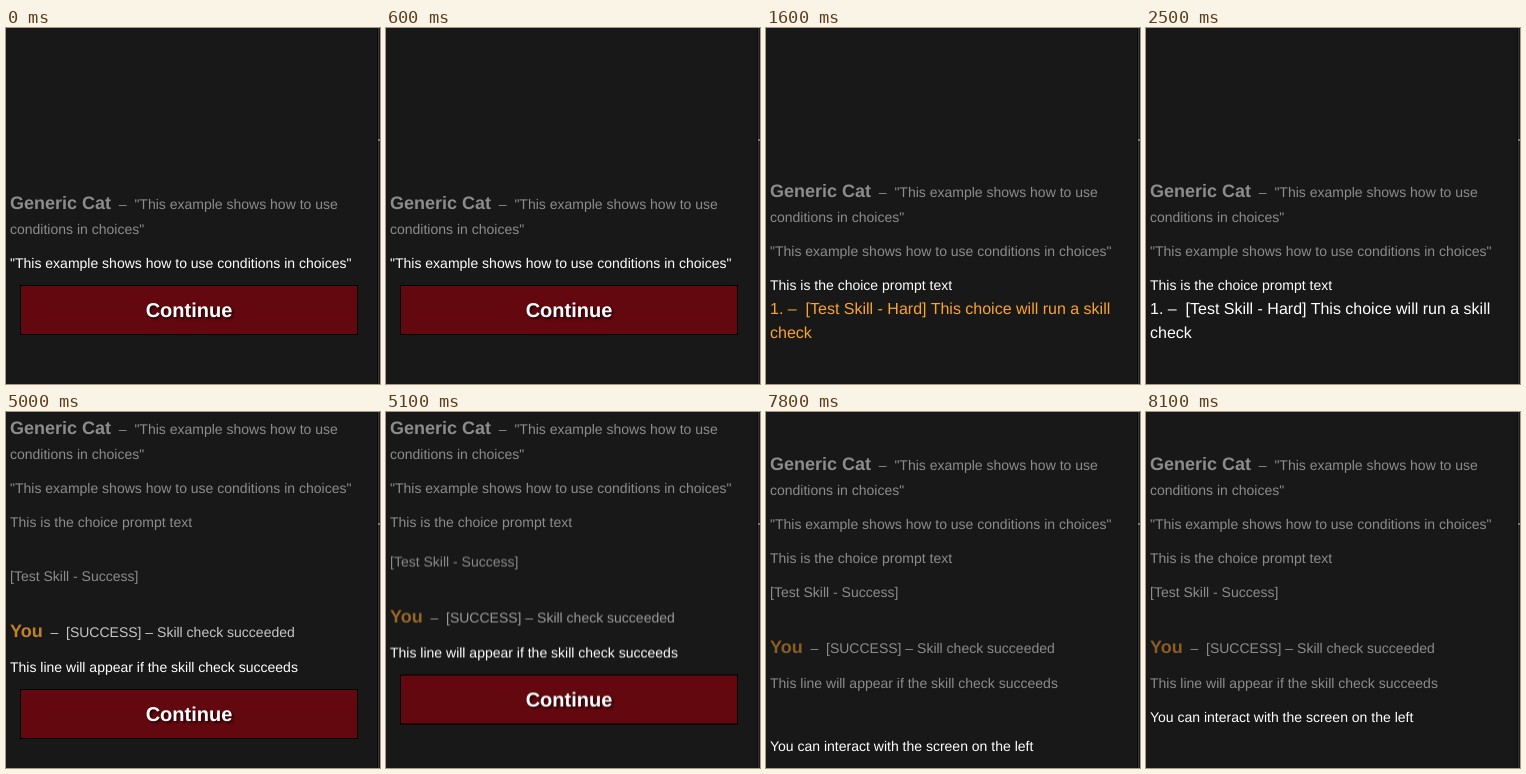
An HTML page for the animation above (9500 ms loop, 374 by 356 pixels).

```html
<!DOCTYPE html>
<html lang="en">
<head>
<meta charset="utf-8">
<title>Dialogue choices</title>
<style>
  html, body { margin: 0; width: 100%; height: 100%; overflow: hidden; background: #181818; }
  svg { display: block; }
  text {
    font: 14px "Liberation Sans", Arial, sans-serif;
    fill: #fff;
    text-rendering: geometricPrecision;
  }
  .name { font-size: 18px; font-weight: bold; }
  .you { fill: #f8a430; }
  .choice text { font-size: 16px; fill: inherit; }
  .button text {
    font-size: 20px;
    font-weight: bold;
    text-anchor: middle;
    text-shadow: 2px 2px 2px rgba(0, 0, 0, .6);
  }
  .old { opacity: .5; }

  .log, .first, .ask, .prompt, .choice, .result, .reply, .outcome, .last, .button {
    animation: 9.5s step-end infinite;
  }
  .log { animation-name: scroll; }
  .first { animation-name: first; }
  .ask { animation-name: ask; }
  .prompt { animation-name: prompt; }
  .choice { animation-name: choice; }
  .result { animation-name: result; }
  .reply { animation-name: reply; }
  .outcome { animation-name: outcome; }
  .last { animation-name: last; }
  .button { animation-name: button; }

  @keyframes scroll {
    0% { transform: translateY(12px); }
    13.684% { transform: none; }
    52.631% { transform: translateY(-147px); }
    82.105%, 100% { transform: translateY(-111px); }
  }
  @keyframes first {
    0% { opacity: 1; }
    13.684%, 100% { opacity: .5; }
  }
  /* prompt and choice slide up together */
  @keyframes ask {
    0% { opacity: 0; }
    13.684% { opacity: 1; transform: translateY(29px); }
    14.736% { opacity: 1; transform: translateY(10px); }
    15.789% { opacity: 1; transform: translateY(2px); }
    16.842%, 100% { opacity: 1; transform: none; }
  }
  @keyframes prompt {
    0% { opacity: 1; }
    52.631%, 100% { opacity: .5; }
  }
  @keyframes choice {
    0% { fill: #f8a430; opacity: 1; }
    23.157% { fill: #fbc47a; opacity: 1; }
    24.21% { fill: #fef4e6; opacity: 1; }
    26.315% { fill: #fff; opacity: 1; }
    52.631%, 100% { fill: #fff; opacity: 0; }
  }
  @keyframes result {
    0% { opacity: 0; }
    52.631% { opacity: 1; transform: translateY(20px); }
    53.684% { opacity: 1; transform: translateY(5.5px); }
    54.736% { opacity: 1; transform: translateY(1px); }
    55.789%, 100% { opacity: 1; transform: none; }
  }
  @keyframes reply {
    0% { opacity: .76; }
    53.684% { opacity: .57; }
    54.736% { opacity: .51; }
    55.789%, 100% { opacity: .5; }
  }
  @keyframes outcome {
    0% { opacity: 1; }
    82.105%, 100% { opacity: .5; }
  }
  @keyframes last {
    0% { opacity: 0; }
    82.105% { opacity: 1; transform: translateY(29px); }
    83.157% { opacity: 1; transform: translateY(10px); }
    84.21% { opacity: 1; transform: translateY(2px); }
    85.263%, 100% { opacity: 1; transform: none; }
  }
  @keyframes button {
    0% { opacity: 1; transform: none; }
    13.684% { opacity: 0; }
    52.631% { opacity: 1; transform: translateY(20px); }
    53.684% { opacity: 1; transform: translateY(5.5px); }
    54.736% { opacity: 1; transform: translateY(1px); }
    55.789% { opacity: 1; transform: none; }
    82.105%, 100% { opacity: 0; }
  }
</style>
</head>
<body>
<svg width="374" height="356" viewBox="0 0 374 356">
  <rect width="374" height="356" fill="#181818"/>

  <g class="log">
    <g class="old">
      <text x="4" y="169"><tspan class="name">Generic Cat</tspan>&#160;&#160;–&#160;&#160;"This example shows how to use</text>
      <text x="4" y="194">conditions in choices"</text>
    </g>
    <text class="first" x="4" y="228">"This example shows how to use conditions in choices"</text>

    <g class="ask">
      <text class="prompt" x="4" y="262">This is the choice prompt text</text>
      <g class="choice">
        <text x="4" y="286">1. –&#160;&#160;[Test Skill - Hard] This choice will run a skill</text>
        <text x="4" y="310">check</text>
      </g>
    </g>

    <g class="result">
      <text class="old" x="4" y="296">[Test Skill - Success]</text>
      <text class="reply" x="4" y="352"><tspan class="name you">You</tspan>&#160;&#160;–&#160;&#160;[SUCCESS] – Skill check succeeded</text>
      <text class="outcome" x="4" y="387">This line will appear if the skill check succeeds</text>
    </g>

    <text class="last" x="4" y="421">You can interact with the screen on the left</text>
  </g>

  <g class="button">
    <rect x="14.5" y="257.5" width="337" height="49" fill="#63080f" stroke="#000"/>
    <text x="183" y="289">Continue</text>
  </g>

  <!-- panel edge with its handle -->
  <rect x="371" width="1" height="356" fill="#0c0c0c"/>
  <rect x="372" width="1" height="356" fill="#343434"/>
  <rect x="372" y="111" width="2" height="2" fill="#777"/>
</svg>
</body>
</html>
```
